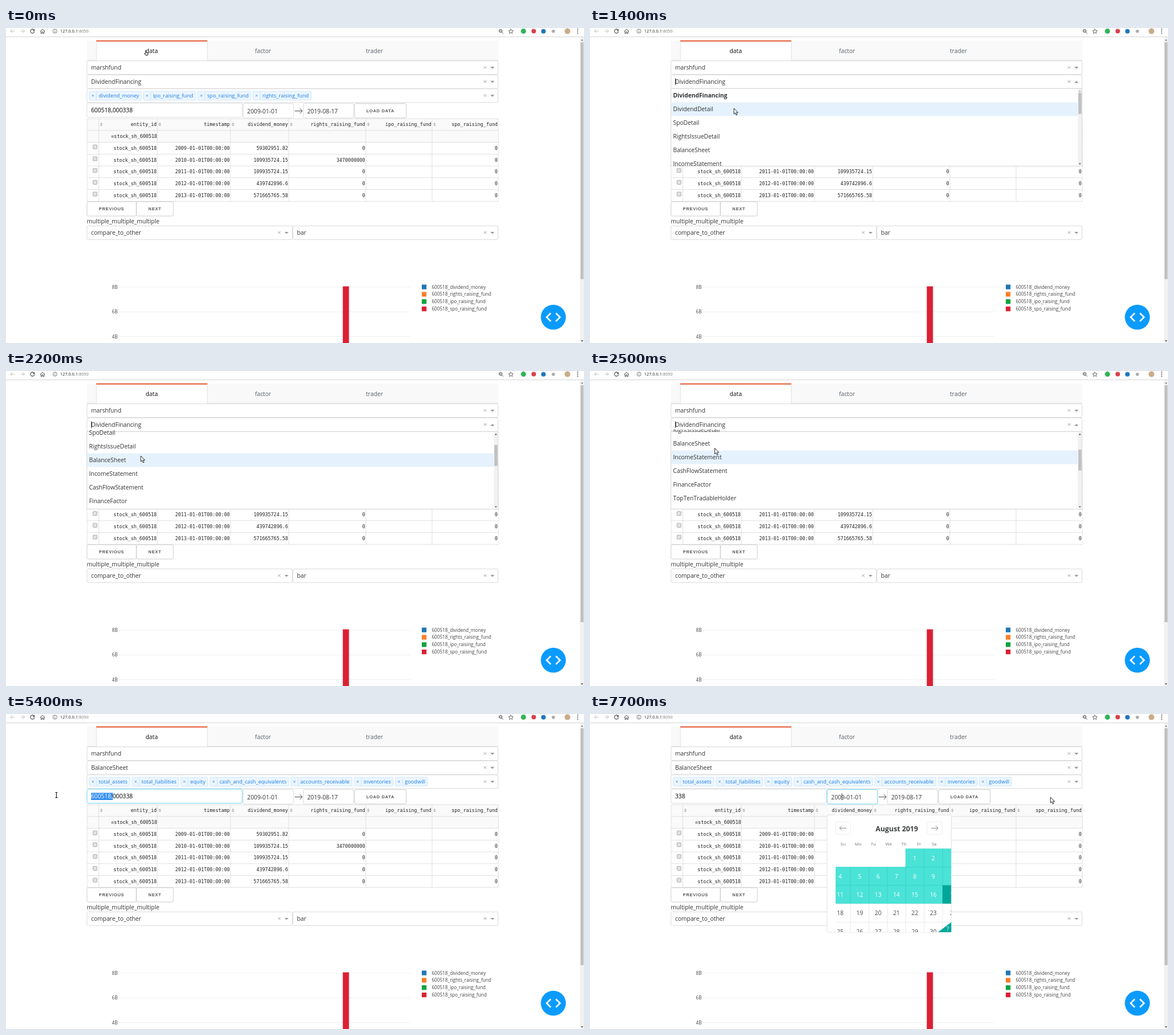
Write an HTML page that moves like this. It is 1012 px wide and 553 px high and loops after 8 s.

```html
<!DOCTYPE html>
<html lang="en">
<head>
<meta charset="utf-8">
<title>Data dashboard</title>
<style>
  html, body { margin: 0; width: 100%; height: 100%; overflow: hidden; background: #fff; }
  svg { display: block; width: 100%; height: 100%; }
  text { font: 10.25px "Open Sans", "Noto Sans", sans-serif; font-kerning: none; fill: #333; white-space: pre; }
  .mono { font: 8.37px "DejaVu Sans Mono", monospace; fill: #222; text-anchor: end; }
  .btn { font: bold 7.5px "Liberation Sans", Arial, sans-serif; font-kerning: normal; letter-spacing: .68px; fill: #555; }
  .small { font-size: 8.2px; fill: #444; }
  .tag { font-size: 9.22px; fill: #1a7fe0; }
  .tab { fill: #586069; }
  .mid { text-anchor: middle; }
  .end { text-anchor: end; }
  .bold { font-weight: 700; }
</style>
</head>
<body>
<svg id="stage" viewBox="0 0 1012 553" preserveAspectRatio="none"></svg>
<script>
const LOOP = 8000, STEP = 100;

const text = (x, y, s, cls = '', more = '') => `<text x="${x}" y="${y}" class="${cls}" ${more}>${s}</text>`;
const rect = (x, y, w, h, fill, more = '') => `<rect x="${x}" y="${y}" width="${w}" height="${h}" fill="${fill}" ${more}/>`;
const box = (x, y, w, h, stroke = '#ccc', more = '') => rect(x, y, w, h, '#fff', `rx="2.5" stroke="${stroke}" stroke-width=".75" ${more}`);
const path = (d, stroke, w = 1, fill = 'none') => `<path d="${d}" fill="${fill}" stroke="${stroke}" stroke-width="${w}"/>`;
const shape = (d, fill) => `<path d="${d}" fill="${fill}"/>`;
const disc = (x, y, r, fill) => `<circle cx="${x}" cy="${y}" r="${r}" fill="${fill}"/>`;
const group = (id, body, more = '') => `<g id="${id}" ${more}>${body}</g>`;
const cross = (x, y, r, c, w) => path(`M${x - r} ${y - r}l${2 * r} ${2 * r}m0 ${-2 * r}l${-2 * r} ${2 * r}`, c, w);
const tri = (x, y, w, h, c) => shape(`M${x - w} ${y - h / 2}h${2 * w}l${-w} ${h}z`, c);
const caret = (id, x, y) => rect(x, y, .8, 12, '#111', `id="${id}"`);

function select(x, y, w, label, id = '') {
  const r = x + w, c = y + 12;
  return box(x, y, w, 24, '#ccc', id && `id="${id}"`) + text(x + 7.2, c + 3.7, label, '', id && `id="${id}Text"`) +
    cross(r - 22.7, c - .3, 2.2, '#999', .9) +
    (id ? group(id + 'Arrow', tri(0, 0, 3.5, 3.6, '#999')) : tri(r - 10, c + .3, 3.5, 3.6, '#999'));
}

function browserBar() {
  const arrow = (x, d, c) => path(`M${x - 3.6 * d} 5.5h${7.2 * d}m${-3.4 * d} -3.4l${3.4 * d} 3.4l${-3.4 * d} 3.4`, c, .9);
  return rect(0, 15, 1012, .8, '#c8c8c8') + arrow(11.5, -1, '#bbb') + arrow(29, 1, '#bbb') +
    path('M49 3.4A3.5 3.5 0 1 0 49.8 6', '#444', 1.1) + shape('M50 1.8v3.4h-3.4z', '#444') +
    path('M59.8 6L64 2l4.2 4M61.2 5.2v4.3h1.9V6.8h1.8v2.7h1.9V5.2', '#444', .9) +
    path('M82.2 5.5a3.5 3.5 0 1 0 7 0a3.5 3.5 0 1 0 -7 0M85.7 5v2.5M85.7 3.4v.9', '#555', .8) +
    text(94.7, 8.3, '127.0.0.1<tspan fill="#777">:8050</tspan>', '', 'style="font-size:7.4px;fill:#222"') +
    path('M863.3 5a2.6 2.6 0 1 0 5.2 0a2.6 2.6 0 1 0 -5.2 0M867.8 6.9l2.7 2.7M864.6 5h2.6', '#444', 1) +
    path('M884 1.8l1.2 2.7 2.9.3-2.2 1.9.7 2.9-2.6-1.5-2.6 1.5.7-2.9-2.2-1.9 2.9-.3z', '#444', .8) +
    disc(906, 5.6, 4.5, '#2fb457') + disc(924, 5.6, 4, '#d8434e') + disc(941, 5.8, 4, '#1f78c1') +
    disc(958.3, 5.8, 2.8, '#aaa') + disc(983, 5.6, 5, '#c9ab8b') +
    [2, 5.5, 9].map(y => disc(1001, y, .9, '#444')).join('');
}

const pageScroll = () => rect(1005, 16, 7, 537, '#f1f1f1') + rect(1006, 25, 5.3, 416, '#c1c1c1') +
  tri(1008.6, 21, 2, -2.4, '#777') + tri(1008.6, 549.5, 2, 2.4, '#444');

const tabs = () => rect(141.5, 22, 720.5, 35, '#f9f9f9') + rect(141.5, 56.5, 720.5, .7, '#d6d6d6') +
  rect(158, 22, 194.5, 36, '#fff') + path('M158.3 23v34M352.4 23v34', '#d6d6d6', .7) +
  rect(158, 21.7, 194.5, 2, '#e4562f') + text(255.2, 44, 'data', 'mid', 'style="fill:#111"') +
  text(450, 44, 'factor', 'tab mid') + text(645, 44, 'trader', 'tab mid');

// Each entry is [centre of its cross, label]; `end` is where a next cross would be.
function tags(list, end) {
  return list.map(([x, label], i) => {
    const next = i + 1 < list.length ? list[i + 1][0] : end, left = x - 6.3;
    return rect(left, 111, next - x - 3.6, 15.6, '#ebf5ff', 'rx="1.4" stroke="#c2e0ff" stroke-width=".7"') +
      path(`M${x + 6.3} 111v15.6`, '#c2e0ff', .7) + cross(x, 118.8, 1.5, '#1a7fe0', .8) +
      text(x + 10.2, 122.2, label, 'tag');
  }).join('');
}

const button = (x, y, w, label, tx) => box(x, y, w, 25.2, '#bbb') + text(tx, y + 15.2, label, 'btn');

const inputs = () => box(141.8, 131.9, 272, 24.8, '#d1d1d1', 'id="codes"') +
  rect(149, 138.4, 38, 12.6, '#338ff0', 'id="mark"') + text(149, 148.1, '', '', 'id="codesText" style="fill:#000"') +
  caret('codesCaret', 0, 138.6) +
  box(415.2, 132.4, 88.2, 25.6, '#d1d1d1', 'id="from"') + text(422.3, 150, '2009-01-01') + caret('fromCaret', 440.6, 139.4) +
  path('M505.5 145.7h13.4m-4.6-4.4l4.6 4.4l-4.6 4.4', '#484848', 1) +
  box(520.6, 132.4, 88, 25.6, '#d1d1d1') + text(527.5, 150, '2019-08-17') +
  button(610.3, 132.7, 90.5, 'LOAD DATA', 631);

function table() {
  const cols = [162.5, 265, 393, 495, 630, 746, 862], top = 159.2, pitch = 20.72;
  const heads = ['entity_id', 'timestamp', 'dividend_money', 'rights_raising_fund', 'ipo_raising_fund', 'spo_raising_fund'];
  const money = ['59302951.82', '109935724.15', '109935724.15', '439742896.6', '571665765.58'];
  const cell = (col, row, s, pad = 1.2) => text(cols[col + 1] - pad, (top + pitch * row + 13.1).toFixed(1), s, 'mono');
  let out = rect(142, top, 720, 2 * pitch, '#fafafa');
  heads.forEach((h, i) => {
    const x = cols[i] + 4.4;
    out += group('sort' + i, tri(x, 167.2, 2.3, -2.6, 'currentColor') + tri(x, 171, 2.3, 2.6, 'currentColor'), 'color="#aaa"') + cell(i, 0, h);
  });
  out += cell(0, 1, '=stock_sh_600518', .4);
  money.forEach((m, i) => {
    const row = i + 2;
    out += rect(152.4, top + pitch * row + 4.6, 7, 7, '#e2e2e2', 'rx="1" stroke="#999" stroke-width=".8"');
    ['stock_sh_600518', `${2009 + i}-01-01T00:00:00`, m, i === 1 ? '3470000000' : '0', '', '0']
      .forEach((s, c) => out += cell(c, row, s));
  });
  for (let r = 0; r < 8; r++) out += rect(141.7, top + pitch * r - .35, 720.6, .7, '#d3d3d3');
  [142, ...cols].forEach(x => out += rect(x - .35, top, .7, pitch * 7, '#d3d3d3'));
  return out;
}

function chart() {
  const series = [['dividend_money', '#1f77b4'], ['rights_raising_fund', '#ff7f2a'], ['ipo_raising_fund', '#0aa340'], ['spo_raising_fund', '#dc2033']];
  return ['8B', '6B', '4B'].map((s, i) => {
    const y = 455 + 43.3 * i;
    return rect(198, y - .35, 510, .7, '#eaeaea') + text(195.6, y + 2.9, s, 'small end');
  }).join('') + rect(589.7, 453.5, 10.8, 99.5, series[3][1]) + series.map(([s, c], i) => {
    const y = 454.6 + 12.85 * i;
    return rect(728, y - 4.1, 8.2, 8.2, c) + text(745.4, y + 3, '600518_' + s, 'small');
  }).join('');
}

const debugButton = () => disc(958.3, 507.7, 21.9, '#0a9bfd') +
  path('M953.8 500.5l-7.2 7.2l7.2 7.2M962.8 500.5l7.2 7.2l-7.2 7.2', '#fff', 2.7);

const options = ['DividendFinancing', 'DividendDetail', 'SpoDetail', 'RightsIssueDetail', 'BalanceSheet',
  'IncomeStatement', 'CashFlowStatement', 'FinanceFactor', 'TopTenTradableHolder'];
const menu = () => rect(141.8, 106.3, 719.8, 136, '#fff', 'stroke="#ccc" stroke-width=".75"') +
  `<g clip-path="url(#menuClip)">${group('list', rect(142.2, 0, 712, 24, '#e5f2fd', 'id="hover"') +
    options.map((s, i) => text(145.5, 122.2 + 24 * i, s, i ? '' : 'bold')).join(''))}</g>` +
  rect(854.2, 106.7, 7, 135.2, '#f1f1f1') + rect(855, 114, 5.6, 36.8, '#c1c1c1', 'id="thumb"') +
  group('menuUp', tri(857.7, 111, 1.9, -2.3, 'currentColor')) + tri(857.7, 238.6, 1.9, 2.3, '#444');

function calendar() {
  const mid = [438, 472.2, 504.4, 536.6, 568.7, 601, 636];
  const nav = (x, d) => box(x, 189.2, 26, 22, '#e4e7e7') +
    path(`M${x + 13 - 6 * d} 200.4h${12 * d}m${-4 * d}-4l${4 * d} 4l${-4 * d} 4`, '#82888a', 1);
  let days = '';
  for (let d = 1; d <= 31; d++) {
    const col = (d + 3) % 7, row = Math.floor((d + 3) / 7), picked = d === 17, span = d < 17;
    days += rect(423.9 + 32.25 * col, 236.6 + 32.2 * row, 32.25, 32.2, picked ? '#00a699' : span ? '#4be2d8' : '#fff',
      `stroke="${span ? '#2fd3c8' : picked ? '#00a699' : '#e4e7e7'}" stroke-width=".7"`) +
      text(mid[col], (256.7 + 32.2 * row).toFixed(1), d, 'mid', `style="fill:${span || picked ? '#fff' : '#484848'}"`);
  }
  return rect(415, 177.2, 217.6, 205.8, '#fff', 'id="sheet" rx="2" stroke="#d8d8d8" stroke-width=".8"') +
    path('M426.2 177.6L433 170.6L439.8 177.6', '#d0d0d0', .7, '#fff') +
    nav(430, -1) + nav(590.3, 1) +
    text(537.2, 205.8, 'August 2019', 'mid bold', 'style="font-size:12.3px;fill:#3c3f40"') +
    ['Su', 'Mo', 'Tu', 'We', 'Th', 'Fr', 'Sa'].map((s, i) => text(443 + 26.6 * i, 230.6, s, 'mid', 'style="font-size:7.6px;fill:#757575"')).join('') +
    `<g clip-path="url(#dayClip)">${days}</g>` +
    group('help', shape('M609.5 383h23v-17.5z', '#00a699') + text(626.5, 381, '?', 'mid', 'style="fill:#fff"'));
}

const cursors = () =>
  group('arrow', path('M0 0V10.2L2.3 8L4 11.9L5.8 11.1L4.1 7.4H7.2Z', '#111', .9, '#fff')) +
  group('hand', path('M.8 .6C1.6 0 2.2.6 2.2 1.4V4L4.4 4.5Q5.2 4.9 5 5.8L4.5 8.8H.8L-1.2 5.8Q-1 4.8 0 5.4L.6 6V1.2Z', '#111', 1, '#fff')) +
  group('beam', ['#fff', '#111'].map((c, i) => path('M-2-4.8Q0-4.8 0-3.8Q0-4.8 2-4.8M0-3.8V3.8M-2 4.8Q0 4.8 0 3.8Q0 4.8 2 4.8', c, i ? 1.1 : 2.4)).join(''));

const before = [[152, 'dividend_money'], [247, 'ipo_raising_fund'], [342, 'spo_raising_fund'], [438.6, 'rights_raising_fund']];
const after = [[152, 'total_assets'], [227, 'total_liabilities'], [312.3, 'equity'], [363.5, 'cash_and_cash_equivalents'],
  [505, 'accounts_receivable'], [615.8, 'inventories'], [688, 'goodwill']];

document.getElementById('stage').innerHTML =
  `<clipPath id="menuClip">${rect(142, 103, 719, 139, '#000')}</clipPath>` +
  `<clipPath id="dayClip">${rect(430, 236.2, 202.3, 146.6, '#000', 'id="dayClipBox"')}</clipPath>` +
  rect(0, 0, 1012, 553, '#fff') + browserBar() + pageScroll() + tabs() +
  select(141.8, 57.6, 719.8, 'marshfund') + box(141.8, 106.8, 719.8, 24, '#ccc') +
  cross(838.9, 118.5, 2.2, '#999', .9) + tri(851.6, 119.1, 3.5, 3.6, '#999') +
  group('tagsBefore', tags(before, 544.2)) + group('tagsAfter', tags(after, 747.8)) +
  rect(140.8, 81.2, 721.8, 26, 'none', 'id="glow" rx="3" stroke="#007eff" stroke-opacity=".12" stroke-width="2.4"') +
  select(141.8, 82.2, 719.8, 'DividendFinancing', 'kind') + caret('kindCaret', 149, 88.2) +
  inputs() + table() + button(141.8, 304.9, 86.4, 'PREVIOUS', 162.8) + button(228.4, 304.9, 64.6, 'NEXT', 249.3) +
  text(141.5, 342.8, 'multiple_multiple_multiple') + select(141.8, 347.4, 359.4, 'compare_to_other') +
  select(502.4, 347.4, 359.2, 'bar') + chart() + debugButton() +
  group('menu', menu()) + group('calendar', calendar()) + cursors();

const el = id => document.getElementById(id);
const show = (id, on) => el(id).setAttribute('visibility', on ? 'visible' : 'hidden');
const set = (id, name, value) => el(id).setAttribute(name, value);
const move = (id, x, y, more = '') => set(id, 'transform', `translate(${x} ${y})${more}`);

// Linear value between [time, ...values] keys.
function between(keys, t) {
  const i = keys.findIndex(k => k[0] > t);
  if (i < 0) return keys[keys.length - 1].slice(1);
  const a = keys[i - 1] || keys[i], b = keys[i], f = Math.max(0, (t - a[0]) / (b[0] - a[0] || 1));
  return a.slice(1).map((v, n) => v + (b[n + 1] - v) * f);
}
const latest = (keys, t) => keys.filter(k => k[0] <= t).pop().slice(1);

const glide = [[100, 243.7, 39], [300, 248, 58], [500, 250, 88], [600, 250, 92], [700, 250, 100], [900, 251, 130.5],
  [1000, 252, 138], [1100, 252, 138], [1400, 252, 141], [1600, 250, 148], [1800, 246, 153], [2000, 242.4, 154.4], [2100, 241, 152], [2300, 231, 146], [2500, 218.4, 135.6]];
const jumps = [[4100, 'beam', 187, 145], [5400, 'beam', 88.3, 142.3], [6100, 'arrow', 320.6, 169.8],
  [6300, 'arrow', 428.4, 165.8], [6600, 'arrow', 435.4, 156], [6900, 'beam', 441, 145], [7200, 'arrow', 806.2, 146]];
const wheel = [[1700, 0], [1900, 29], [2000, 29], [2200, 58], [2400, 87]];
const codes = [[0, '600518,000338'], [5400, '<tspan fill="#fff">600518,</tspan>000338'], [6100, '000338'], [7200, '338']];
const codeCaret = [[0, 0], [4400, 186.8], [5400, 0], [6100, 149], [6300, 0], [6900, 184.2], [7200, 0]];

function draw(t) {
  const within = (a, b) => t >= a && t < b;
  const open = within(600, 4100), chosen = t >= 4100, focus = within(4100, 4400), picking = t >= 7200;

  const [kind, x, y] = t < 4100 ? [t < 300 ? 'hand' : 'arrow', ...between(glide, t)] : latest(jumps, t);
  for (const id of ['arrow', 'hand', 'beam']) show(id, id === kind);
  move(kind, x, y);

  show('menu', open);
  const [scroll] = between(wheel, t), at = Math.min(t, 2400);
  const row = Math.max(0, Math.floor((between(glide, at)[1] - 106.5 + between(wheel, at)[0]) / 24));
  move('list', 0, -scroll);
  set('hover', 'y', 106.5 + 24 * row);
  move('thumb', 0, .275 * scroll);
  set('menuUp', 'color', scroll ? '#444' : '#a3a3a3');

  move('kindArrow', 851.6, 94.6, open ? ' scale(1 -1)' : '');
  show('kindCaret', within(600, 1000) || within(1200, 1700) || within(2200, 4100));
  el('kindText').textContent = options[chosen ? 4 : 0];
  set('kind', 'stroke', focus ? '#2a86e0' : '#ccc');
  show('glow', focus);
  show('tagsBefore', !chosen);
  show('tagsAfter', chosen);

  el('codesText').innerHTML = latest(codes, t)[0];
  set('codes', 'stroke', within(4400, 7200) ? '#33c3f0' : '#d1d1d1');
  show('mark', within(5400, 6100));
  const [cx] = latest(codeCaret, t);
  show('codesCaret', cx > 0);
  set('codesCaret', 'x', cx);
  set('sort2', 'color', within(6300, 6600) ? '#444' : '#aaa');

  const full = t >= 7700;
  set('from', 'stroke', picking ? '#33c3f0' : '#d1d1d1');
  show('fromCaret', full);
  show('calendar', picking);
  show('help', full);
  set('sheet', 'height', full ? 205.8 : 202.4);
  set('dayClipBox', 'height', full ? 146.6 : 143.2);
}

const start = performance.now();
let last = -1;
function tick() {
  const t = Math.floor((performance.now() - start) % LOOP / STEP) * STEP;
  if (t !== last) draw(last = t);
  requestAnimationFrame(tick);
}
tick();
</script>
</body>
</html>
```
